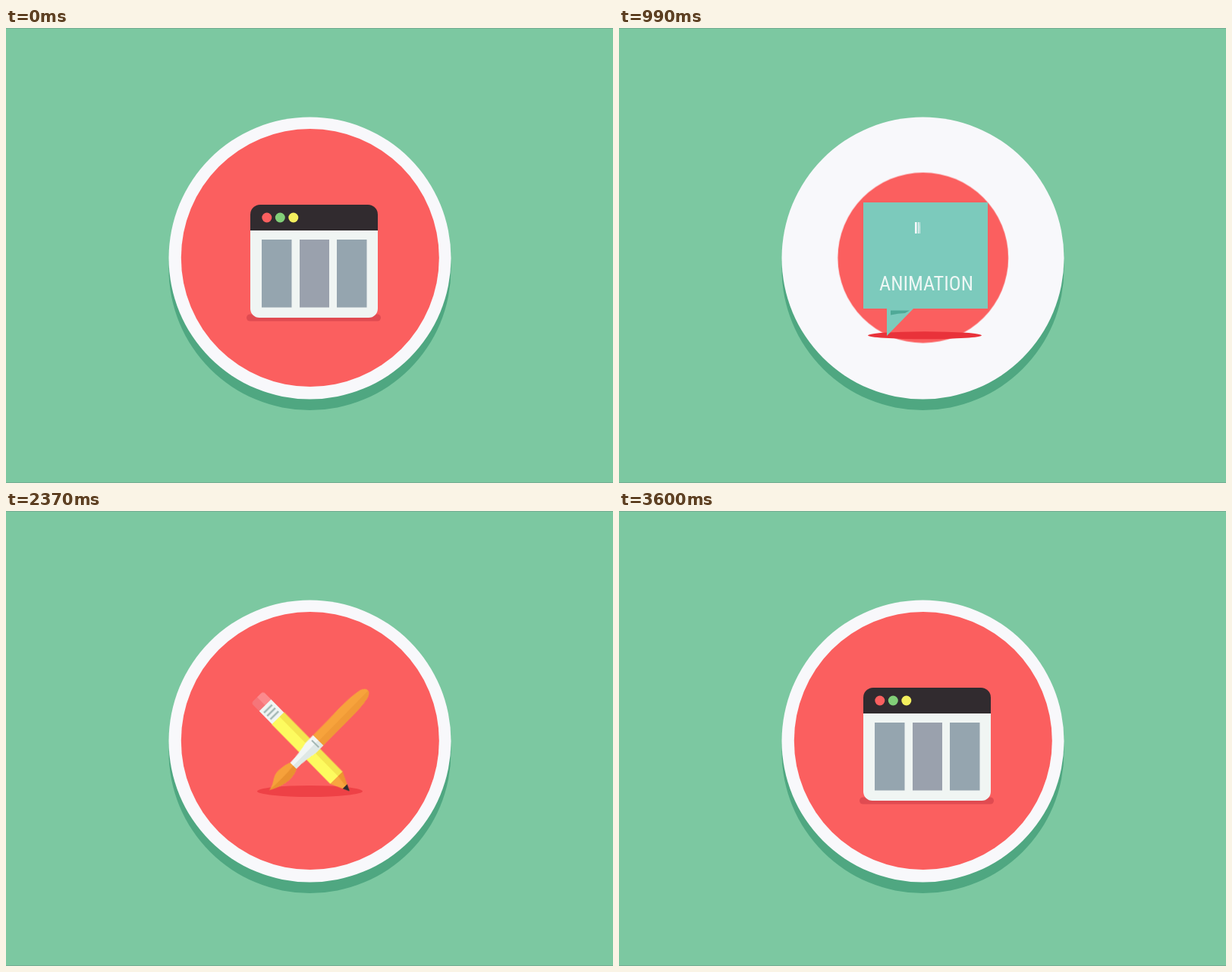
An HTML page for the animation above (5600 ms loop, 800 by 600 pixels).

```html
<!DOCTYPE html>
<html lang="en">
<head>
<meta charset="utf-8">
<title>Badge animation</title>
<style>
  html, body { margin: 0; width: 100%; height: 100%; overflow: hidden; background: #7cc8a1; }
  svg { display: block; width: 100%; height: 100%; }

  /* One loop is 5600 ms, so 1% is 56 ms. */
  .a { animation: 5600ms linear infinite; }

  .shade { animation-name: shade; transform-origin: 400px 492px; }
  .rim { animation-name: rim; transform-origin: 400.5px 303.5px; }
  .disc { animation-name: disc; transform-origin: 400.5px 303px; }

  .bubble { animation-name: bubble; transform-origin: 404px 318px; }
  .bubble-shade { animation-name: bubble-shade; transform-origin: 403px 408px; }
  .flap { animation-name: flap; transform-origin: 486px 230px; }
  .word { animation-name: word; }
  .bars { animation-name: bars; transform-origin: 390px 263px; }
  .wedge { animation-name: wedge; transform-origin: 370px 374px; }
  .streak { animation-name: streak; }

  .drop { animation-name: drop; }
  .late { animation-delay: 60ms; }
  .wipe-pencil { animation-name: wipe-pencil; }
  .wipe-brush { animation-name: wipe-brush; }
  .tool-shade { animation-name: tool-shade; transform-origin: 400.5px 369.5px; }

  .window { animation-name: window; }
  .pane { animation-name: pane; transform-origin: 405.5px 325px; }
  .pane-shade { animation-name: pane-shade; transform-origin: 405.5px 382px; }
  .columns { animation-name: columns; transform-origin: 406px 368px; }
  .bar { animation-name: bar; transform-origin: 405.5px 250px; }
  .dot { animation-name: dot; transform-box: fill-box; transform-origin: center; }
  .later { animation-delay: 120ms; }

  @keyframes shade {
    0%, .535% { transform: scale(1); }
    .536%, 5.36% { transform: scale(0); animation-timing-function: cubic-bezier(.65, 0, .35, 1); }
    11.36%, 100% { transform: scale(1); }
  }
  @keyframes rim {
    0%, .535% { transform: scale(1); }
    .536%, 7.7% { transform: scale(0); animation-timing-function: ease-out; }
    11.79% { transform: scale(1.046); animation-timing-function: ease-in-out; }
    13.93%, 100% { transform: scale(1); }
  }
  @keyframes disc {
    0%, .535% { transform: scale(1); }
    .536%, 15.4% { transform: scale(0); animation-timing-function: ease-out; }
    20.5% { transform: scale(1.05); animation-timing-function: ease-in-out; }
    23.6%, 100% { transform: scale(1); }
  }
  @keyframes bubble {
    0%, 5.36% { transform: scale(0); animation-timing-function: cubic-bezier(.65, 0, .35, 1); }
    11.36%, 27.86% { transform: scale(1); animation-timing-function: ease-in; }
    32.7%, 100% { transform: scale(0); }
  }
  @keyframes bubble-shade {
    0%, 5.36% { transform: scale(0); animation-timing-function: cubic-bezier(.65, 0, .35, 1); }
    11.36%, 25.7% { transform: scale(1); }
    30.5%, 100% { transform: scale(0); }
  }
  @keyframes flap {
    0%, 10% { transform: scaleX(1); }
    12.857% { transform: scaleX(.921); }
    14.8%, 100% { transform: scaleX(1); }
  }
  @keyframes word {
    0%, 10.71% { transform: translateX(141px); animation-timing-function: cubic-bezier(.4, .65, .6, 1); }
    15%, 100% { transform: none; }
  }
  @keyframes bars {
    0%, 17.1% { transform: scaleX(0); animation-timing-function: ease-out; }
    21.4%, 100% { transform: scaleX(1); }
  }
  @keyframes wedge {
    0%, 11.36% { transform: scale(0); }
    12.857% { transform: scale(.52); }
    15.5%, 100% { transform: scale(1); }
  }
  @keyframes streak {
    0%, 25.7% { opacity: 0; }
    26.8%, 100% { opacity: 1; }
  }
  @keyframes drop {
    0%, 35.9% { transform: translateY(-240px); animation-timing-function: ease-in; }
    39% { transform: none; animation-timing-function: ease-out; }
    40% { transform: translateY(-6px); animation-timing-function: ease-in; }
    41%, 56% { transform: none; }
    56.01%, 100% { transform: translateY(-240px); }
  }
  @keyframes wipe-pencil {
    0%, 49.3% { clip-path: inset(0 0 0 0); }
    54.6%, 100% { clip-path: inset(100% 0 0 0); }
  }
  @keyframes wipe-brush {
    0%, 52.5% { clip-path: inset(0 0 0 0); }
    55.7%, 100% { clip-path: inset(100% 0 0 0); }
  }
  @keyframes tool-shade {
    0%, 37.5% { transform: scale(0); animation-timing-function: ease-out; }
    40.2%, 49.3% { transform: scale(1); animation-timing-function: ease-in; }
    51.4%, 100% { transform: scale(0); }
  }
  @keyframes window {
    0%, .535% { opacity: 1; }
    .536%, 50% { opacity: 0; }
    50.01%, 100% { opacity: 1; }
  }
  @keyframes pane {
    0%, .535% { transform: scale(1); }
    .536%, 50.4% { transform: scale(0); animation-timing-function: ease-out; }
    53% { transform: scale(1.08); animation-timing-function: ease-in-out; }
    54.64% { transform: scale(.983); }
    56.25%, 100% { transform: scale(1); }
  }
  @keyframes pane-shade {
    0%, .535% { transform: scaleX(1); }
    .536%, 50.4% { transform: scaleX(0); animation-timing-function: ease-out; }
    54.64% { transform: scaleX(1.04); animation-timing-function: ease-in-out; }
    57%, 100% { transform: scaleX(1); }
  }
  @keyframes columns {
    0%, .535% { transform: scaleY(1); }
    .536%, 52% { transform: scaleY(0); animation-timing-function: ease-out; }
    54.1%, 100% { transform: scaleY(1); }
  }
  @keyframes bar {
    0%, .535% { transform: scale(1); }
    .536%, 53.3% { transform: scale(0); }
    55.71% { transform: scale(1.09); animation-timing-function: ease-in-out; }
    57.9%, 100% { transform: scale(1); }
  }
  @keyframes dot {
    0%, .535% { transform: scale(1); }
    .536%, 53.04% { transform: scale(0); }
    55.2% { transform: scale(1.2); animation-timing-function: ease-in-out; }
    57%, 100% { transform: scale(1); }
  }
</style>
</head>
<body>
<svg viewBox="0 0 800 600" preserveAspectRatio="none">
  <defs>
    <clipPath id="inDisc"><circle cx="401" cy="303" r="170"/></clipPath>
    <clipPath id="inCard"><path d="M322 230h164v140H322z"/></clipPath>
  </defs>

  <path d="M0 .5h800M0 599.5h800" stroke="#74ad92"/>

  <circle class="a shade" cx="400.5" cy="318" r="186" fill="#4fa781"/>
  <circle class="a rim" cx="400.5" cy="303.5" r="186" fill="#f8f8fb"/>
  <circle class="a disc" cx="400.8" cy="303" r="170" fill="#fb5f5f"/>

  <ellipse class="a bubble-shade" cx="403" cy="405.3" rx="75" ry="5" fill="#e9323a"/>
  <g class="a bubble">
    <path class="a streak" d="M391 371h18q-6 3-18 3z" fill="#e04348"/>
    <path d="M322 299h164v71h-98l-35 36v-36h-31z" fill="#7ccabc"/>
    <path class="a flap" d="M322 230h164v70H322z" fill="#7ccabc"/>
    <path class="a wedge" d="M358 372.5h25l-6 3.5q-9 0-19 2.500z" fill="#4fa997"/>
    <path class="a bars" d="M390 256h12v15h-12zM408 256h6v15h-6zM417.500 256h2.500q3 7 3 15h-4z" fill="#f8f8fb"/>
    <g clip-path="url(#inCard)">
      <text id="word" class="a word" x="405" y="346" text-anchor="middle" fill="#eef7f5"
        style="font-stretch: extra-condensed; font-size: 32px">ANIMATION</text>
    </g>
  </g>

  <ellipse class="a tool-shade" cx="400.5" cy="369.5" rx="69.5" ry="7.500" fill="#ee4146"/>
  <g clip-path="url(#inDisc)">
    <g class="a drop">
      <g transform="translate(331 245.500) rotate(45.500)">
        <g class="a wipe-pencil">
          <path d="M16-11H4q-4 0-4 4V0h16z" fill="#fb8a8d"/>
          <path d="M16 11H4q-4 0-4-4V0h16z" fill="#f57579"/>
          <path d="M15-11h24v22H15z" fill="#f0f5f4"/>
          <path d="M21-7V8M27-7V8M33-7V8" stroke="#a3b7b4" stroke-width="2.500"/>
          <path d="M39-11.500h110V0H39z" fill="#f3e64f"/>
          <path d="M39-3h110v14.500H39z" fill="#fdfb5f"/>
          <path d="M149-11.500L174 0H149z" fill="#ee9431"/>
          <path d="M149 11.500L174 0 149-3z" fill="#f8a540"/>
          <path d="M165-4.200L174 0l-9 4.200z" fill="#312b2f"/>
        </g>
      </g>
    </g>
    <g class="a drop late">
      <g transform="translate(347 368) rotate(-45.500)">
        <g class="a wipe-brush">
          <path d="M0 0C12-1 14-10 28-9.500Q38-9 46-5.500V5.500Q36 11 24 9 12 7 0 0z" fill="#f6a13b"/>
          <path d="M0 0Q24 2 46 0V5.500Q36 11 24 9 12 7 0 0z" fill="#e9912f"/>
          <path d="M88-9.500H120Q160-11 178-7 185-4 185 0 185 4 178 7 160 11 120 9.500H88z" fill="#f7a33c"/>
          <path d="M88 1H185Q185 4 178 7 160 11 120 9.500H88z" fill="#f09a36"/>
          <path d="M45-5.500Q64-6 78-9.500H92V9.500H78Q64 6 45 5.500z" fill="#f2f6f5"/>
          <path d="M45 0H92V9.500H78Q64 6 45 5.500z" fill="#dfe8e6"/>
          <path d="M86-6V7" stroke="#a3b7b4" stroke-width="2"/>
        </g>
      </g>
    </g>
  </g>

  <g class="a window">
    <rect class="a pane-shade" x="317" y="377.500" width="177" height="9" rx="4.500" fill="#e04b51"/>
    <path class="a pane" d="M322 267h168v103a12 12 0 0 1-12 12H334a12 12 0 0 1-12-12z" fill="#f0f5f3"/>
    <g class="a columns" fill="#95a5af">
      <rect x="337" y="279" width="39.500" height="89.500"/>
      <rect x="387" y="279" width="39" height="89.500" fill="#9aa1ad"/>
      <rect x="436" y="279" width="39.500" height="89.500"/>
    </g>
    <path class="a bar" d="M322 267V246a13 13 0 0 1 13-13h142a13 13 0 0 1 13 13v21z" fill="#312b2f"/>
    <circle class="a dot" cx="343.800" cy="250" r="6.500" fill="#fb5f5f"/>
    <circle class="a dot late" cx="361.300" cy="250" r="6.500" fill="#82cf78"/>
    <circle class="a dot later" cx="378.800" cy="250" r="6.500" fill="#f3ef5e"/>
  </g>
</svg>
<script>
  // Use the narrowest installed face, at a size that suits the bubble.
  const word = document.getElementById('word');
  const faces = ['Roboto Condensed', 'Liberation Sans Narrow', 'Noto Sans', 'Open Sans', 'Roboto'];
  const setFace = face => { word.style.fontFamily = `"${face}", sans-serif`; };
  const widths = faces.map(face => {
    setFace(face);
    return word.getComputedTextLength();
  });
  const width = Math.min(...widths);
  setFace(faces[widths.indexOf(width)]);
  word.style.fontSize = 32 * Math.min(1, 124 / width) + 'px';
</script>
</body>
</html>
```
